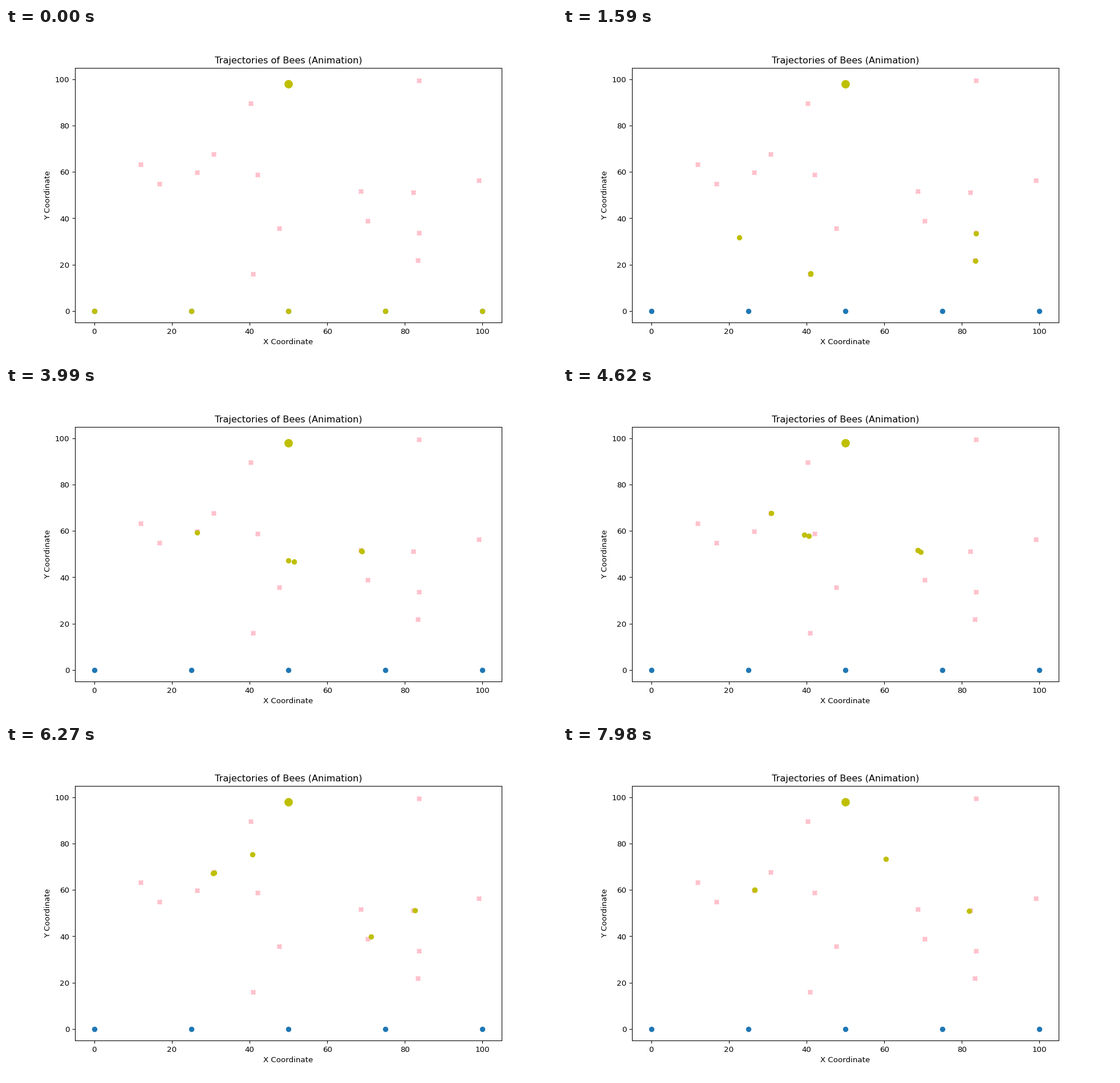
A matplotlib script for the animation above (8000 ms loop, 966x580 px).

```python
import numpy as np
import matplotlib.pyplot as plt
from matplotlib.animation import FuncAnimation

LOOP_MS, STEP_MS, TICK_MS = 8000, 30, 20
STEPS = -(-LOOP_MS // STEP_MS)
SPEED = 0.735

flowers = np.array([
    (11.9, 63.2), (16.8, 55.0), (26.55, 59.9), (30.8, 67.6), (40.35, 89.5),
    (42.05, 58.95), (40.9, 16.1), (47.7, 35.6), (68.7, 51.6), (70.4, 39.0),
    (82.15, 51.3), (83.3, 21.9), (83.6, 33.6), (99.05, 56.4), (83.6, 99.45),
])
hive = np.array([(50, 98)])
homes = np.array([(x, 0) for x in range(0, 101, 25)])

places = np.vstack([flowers, hive])
HIVE = len(flowers)

# Each bee aims at one place after another: (place, step at which it gives up)
plans = [
    [(5, 54), (2, 135), (3, 213), (2, STEPS)],
    [(6, 56), (7, 108), (8, 122), (3, 226), (2, STEPS)],
    [(6, 58), (7, 110), (8, 124), (3, 191), (14, 207), (4, 228), (HIVE, STEPS)],
    [(12, 88), (8, 152), (12, 162), (9, 207), (10, STEPS)],
    [(11, 62), (12, 70), (8, 168), (10, 223), (4, 261), (HIVE, STEPS)],
]


def fly(home, plan):
    """Positions at every step; a fixed stride makes bees hover at their goal."""
    track = [np.array(home, float)]
    for place, until in plan:
        while len(track) <= until:
            way = places[place] - track[-1]
            track.append(track[-1] + SPEED * way / max(np.hypot(*way), 1e-9))
    return track


tracks = np.array([fly(home, plan) for home, plan in zip(homes, plans)])

fig, ax = plt.subplots(figsize=(10, 6.005), dpi=96.6)
ax.set(xlim=(-5, 105), ylim=(-5, 105), title="Trajectories of Bees (Animation)",
       xlabel="X Coordinate", ylabel="Y Coordinate")
ax.plot(*homes.T, "o", color="C0")
ax.plot(*flowers.T, "X", color="pink")
ax.plot(*hive.T, "yo", markersize=10)
bees, = ax.plot([], [], "yo")


def update(tick):
    step = (tick * TICK_MS + TICK_MS // 2) // STEP_MS
    bees.set_data(*tracks[:, step].T)
    return bees,


anim = FuncAnimation(fig, update, frames=LOOP_MS // TICK_MS, interval=TICK_MS,
                     repeat=True, repeat_delay=0, blit=False)
plt.show()
```
